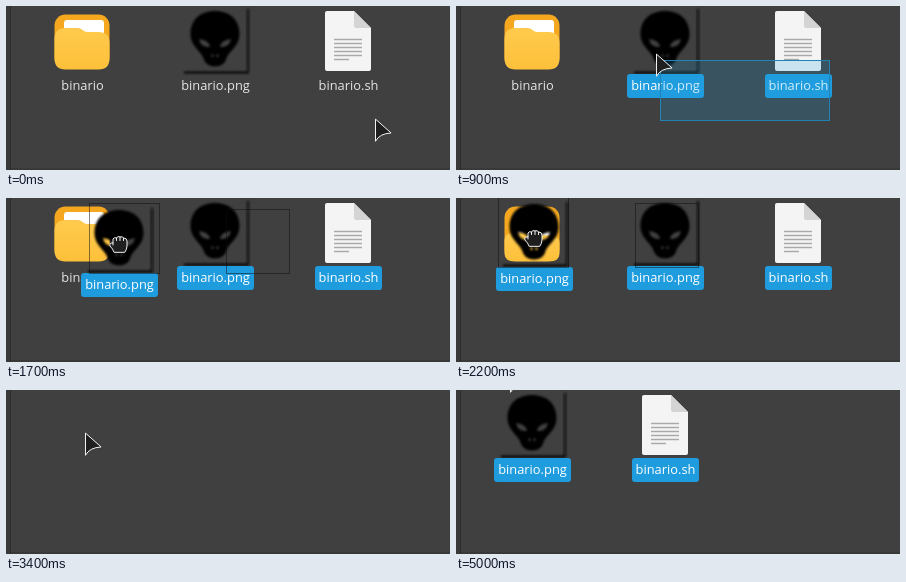
Animation, 444 px wide and 164 px high, one loop 5500 ms. Source, as an HTML page:

```html
<!DOCTYPE html>
<html lang="en">
<head>
<meta charset="utf-8">
<title>Moving files into a folder</title>
<style>
  html, body { margin: 0; width: 100%; height: 100%; overflow: hidden; background: #404040; }
  svg { display: block; width: 444px; height: 164px; }
  text { font: 500 12.85px "Open Sans", "Noto Sans", sans-serif; text-anchor: middle; fill: #e6e6e6; }
  .on text { fill: #fff; }
  .tag { fill: #1f9cde; visibility: hidden; }
  .on .tag { visibility: inherit; }
  .outline { fill: none; stroke: #0c0c0c; stroke-dasharray: 1 1; }
  .pointer { fill: #1f1f1f; stroke: #f2f2f2; stroke-linejoin: round; stroke-linecap: round; }
</style>
</head>
<body>
<svg viewBox="0 0 444 164">
  <defs>
    <filter id="soft" x="-10%" y="-10%" width="120%" height="120%"><feGaussianBlur stdDeviation="0.9"/></filter>
    <linearGradient id="yellow" x2="0" y2="1">
      <stop stop-color="#ffca4d"/><stop offset="1" stop-color="#fdc03a"/>
    </linearGradient>

    <!-- icons are centred on x = 0 -->
    <g id="folderIcon">
      <rect x="-27.500" y="8.500" width="55" height="54" rx="11" fill="#f5a81f"/>
      <rect x="-18" y="14" width="40" height="30" rx="3" fill="#fff"/>
      <path id="lid" d="M-27.500 33q0-11 11-11h12q3 0 5 2t5 2h11q11 0 11 11v15.500q0 11-11 11h-33q-11 0-11-11z" fill="url(#yellow)"/>
    </g>
    <g id="alienIcon">
      <path d="M33 3V66.500H-31" fill="none" stroke="#080808" stroke-width="2" filter="url(#soft)"/>
      <path filter="url(#soft)" fill="#020202" fill-rule="evenodd" d="M0 5C15 5 24.500 14 24.500 28C24.500 41 13 45 11 54Q8 60.500 0 60.500Q-8 60.500-11 54C-13 45-24.500 41-24.500 28C-24.500 14-15 5 0 5Z
        M-16 33Q-6 34-5 41Q-14 42-16 33Z M16 33Q6 34 5 41Q14 42 16 33Z
        M-3.500 48.500h2v2.500h-2z M1.500 48.500h2v2.500h-2z"/>
    </g>
    <g id="scriptIcon">
      <path d="M-21 5H6L23 22V63q0 2-2 2H-21q-2 0-2-2V7q0-2 2-2z" fill="#f4f4f4"/>
      <path d="M6 5L23 22H8q-2 0-2-2z" fill="#d4d4d4"/>
      <path d="M-14 33.500h28m-28 4h28m-28 4h28m-28 4h28m-28 4h28m-28 4h15" stroke="#aaa" stroke-width="1.500"/>
    </g>
  </defs>

  <rect width="444" height="164" fill="#404040"/>
  <rect width="4" height="164" fill="#393939"/>
  <rect x="4" width="1" height="164" fill="#2e2e2e"/>
  <rect x="5" y="162" width="439" height="2" fill="#393939"/>

  <g id="folder"></g>
  <g id="image"></g>
  <g id="script"></g>
  <g id="ghost"></g>
  <g id="outlines">
    <rect class="outline" x="179.500" y="-1.500" width="70" height="70"/>
    <rect class="outline" x="316.500" y="4.500" width="63" height="64"/>
  </g>
  <rect id="band" fill="#209ede" fill-opacity=".2" stroke="#2183b5"/>
  <path id="arrow" class="pointer" d="M.5.5V22.300Q4.500 14.500 15.700 14Z"/>
  <g id="hand" class="pointer">
    <path d="M-5 8Q-6 5-9 2Q-10-1-6-1V-5Q-5-7-2.500-6Q-1-8.500 1-7Q3.500-8 4.500-6Q8-6 8-3V2Q8 5 6 8Z"/>
    <path d="M-6-1V1M-2.500-6V-3.500M1-7V-3.500M4.500-6V-3.500" fill="none"/>
  </g>
</svg>
<script>
const $ = id => document.getElementById(id);
const LOOP = 5500, STEP = 100;
const column = n => 76.5 + 133 * n;
const linear = p => p;
const easeIn = p => p * p;
const easeOut = power => p => 1 - (1 - p) ** power;

// Each move carries the pointer on from where the last one left it
const moves = [
  { from: 100, to: 200, x: 372, y: 113 },
  { from: 400, to: 1000, x: 198, y: 39, ease: easeOut(2.5), easeY: easeOut(1.2) },
  { from: 1100, to: 1400, x: 200, y: 39 },
  { from: 1580, to: 2100, x: 69, y: 39, ease: easeOut(5) },
  { from: 2200, to: 2500, x: 90, y: 43 },
  { from: 2600, to: 2900, x: 79, y: 43 },
  { from: 4000, to: 4400, x: 53, y: -18, ease: easeIn },
  { from: 4800, to: 5000, x: 54, y: -20 }
];

function pointerAt(t) {
  let x = 369, y = 113;
  for (const m of moves) {
    const p = Math.min(1, Math.max(0, (t - m.from) / (m.to - m.from)));
    const ease = m.ease || linear;
    x += (m.x - x) * ease(p);
    y += (m.y - y) * (m.easeY || ease)(p);
  }
  return [Math.round(x), Math.round(y)];
}

const move = (node, x, y) => node.setAttribute('transform', `translate(${x} ${y})`);
const show = (node, on) => { node.style.visibility = on ? 'visible' : 'hidden'; };

function build(id, icon, name, width) {
  $(id).innerHTML = `<use href="#${icon}" x="-.5"/>
    <rect class="tag" x="${-Math.ceil(width) / 2}" y="68" width="${width}" height="24" rx="3"/>
    <text y="84">${name}</text>`;
}

function place(node, visible, n, selected) {
  show(node, visible);
  move(node, column(n), 0);
  node.classList.toggle('on', selected);
}

function draw(time) {
  const t = Math.floor(time % LOOP / STEP) * STEP;
  const [x, y] = pointerAt(t);
  const dragging = t >= 1600 && t < 2300;
  const dropping = t >= 2200 && t < 2300;
  const inside = t >= 3600;
  const banding = t >= 500 && t < 1200;
  const left = x + 4, top = y + 6;
  const picked = t >= 1200 && t < 2400 || t >= 3700;
  const hit = edge => banding && top < 92 && left < edge;

  place($('folder'), t < 3400, 0, t >= 3200);
  place($('image'), t < 2400 || inside, inside ? 0 : 1, picked || hit(248));
  place($('script'), t < 2400 || inside, inside ? 1 : 2, picked || hit(376));
  $('lid').setAttribute('transform', dropping ? 'translate(0 19) scale(1 .7)' : '');

  // The dragged item dips in a shallow arc on its way
  const dx = x - 200;
  const dy = Math.round(1 + 8 * Math.sin(Math.PI * dx / -131));
  show($('ghost'), dragging);
  show($('outlines'), dragging);
  show($('hand'), dragging);
  show($('arrow'), !dragging);
  move($('ghost'), column(1) + dx, dy);
  move($('outlines'), dx - (dropping ? 6 : 0), dy);
  move($('hand'), 209 + dx, 39 + dy);
  move($('arrow'), x, y);

  const band = $('band');
  show(band, banding);
  if (banding) {
    band.setAttribute('x', left + .5);
    band.setAttribute('y', top + .5);
    band.setAttribute('width', 369 - x);
    band.setAttribute('height', 108 - y);
  }
}

build('folder', 'folderIcon', 'binario', 50);
build('image', 'alienIcon', 'binario.png', 77);
build('script', 'scriptIcon', 'binario.sh', 67);
build('ghost', 'alienIcon', 'binario.png', 77);
$('ghost').classList.add('on');

const start = performance.now();
function tick() {
  draw(performance.now() - start);
  requestAnimationFrame(tick);
}
tick();
</script>
</body>
</html>
```
